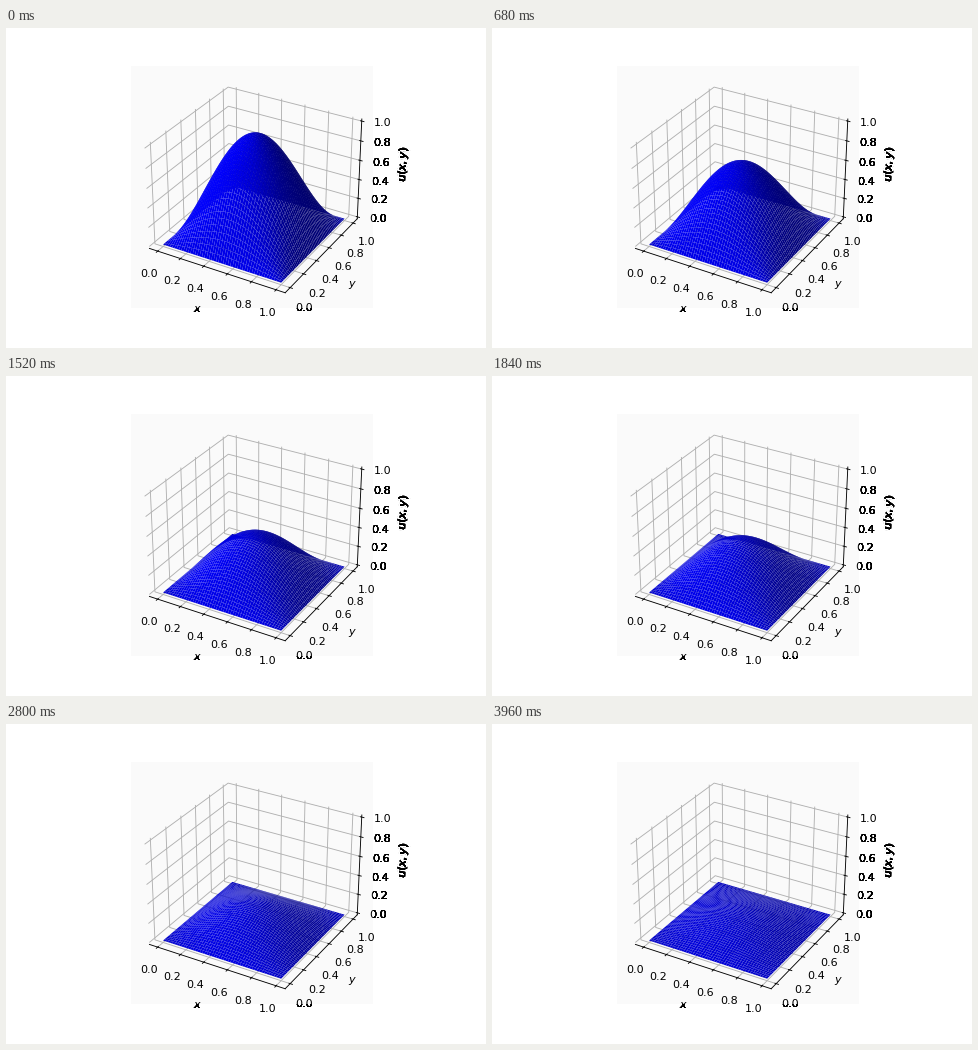
These frames come from a looping animation (480 by 320 pixels, 4 s). A matplotlib script:

```python
import numpy as np
import matplotlib.pyplot as plt
from matplotlib.animation import FuncAnimation

FRAMES = 100
INTERVAL = 40
DECAY = 2 * np.pi**2 * 0.1 / 99   # heat loss of the first mode per frame

fig = plt.figure(figsize=(6, 4), dpi=80, facecolor="white")
fig.subplots_adjust(left=0.125, right=0.9, bottom=0.125, top=0.88)
ax = fig.add_subplot(projection="3d", facecolor="#fafafa")

s = np.linspace(0, 1, 51)
X, Y = np.meshgrid(s, s)
MODE = np.sin(np.pi * X) * np.sin(np.pi * Y)


def set_box():
    ax.set_xlim(-0.05, 1.05, view_margin=1 / 48)
    ax.set_ylim(-0.05, 1.05, view_margin=1 / 48)
    ax.set_zlim(0, 1, view_margin=1 / 48)


def thicken(label, count=8):
    """Stack copies under the axes, so text outside its patch looks heavy."""
    x, y = label.get_transform().transform(label.get_position())
    w, h = fig.bbox.size
    for _ in range(count):
        fig.text(x / w, y / h, label.get_text(),
                 fontsize=label.get_fontsize(),
                 ha=label.get_ha(), va=label.get_va(),
                 rotation=label.get_rotation(),
                 rotation_mode=label.get_rotation_mode(), zorder=-1)


axes = (ax.xaxis, ax.yaxis, ax.zaxis)
for axis in axes:
    axis.set_pane_color((1, 1, 1, 0))
ax.set_xlabel("$x$")
ax.set_ylabel("$y$")
ax.set_zlabel("$u(x,y)$")
set_box()
fig.canvas.draw()

for axis in axes:
    thicken(axis.label)
    for tick in axis.get_major_ticks():
        if 0 <= tick.get_loc() <= 1:
            thicken(tick.label1)

surface = None


def draw(i):
    global surface
    if surface is not None:
        surface.remove()
    surface = ax.plot_surface(X, Y, np.exp(-DECAY * i) * MODE, color="b",
                              rstride=1, cstride=1)
    set_box()
    return [surface]


anim = FuncAnimation(fig, draw, frames=FRAMES, init_func=lambda: [],
                     interval=INTERVAL, repeat=True, repeat_delay=0)
plt.show()
```
